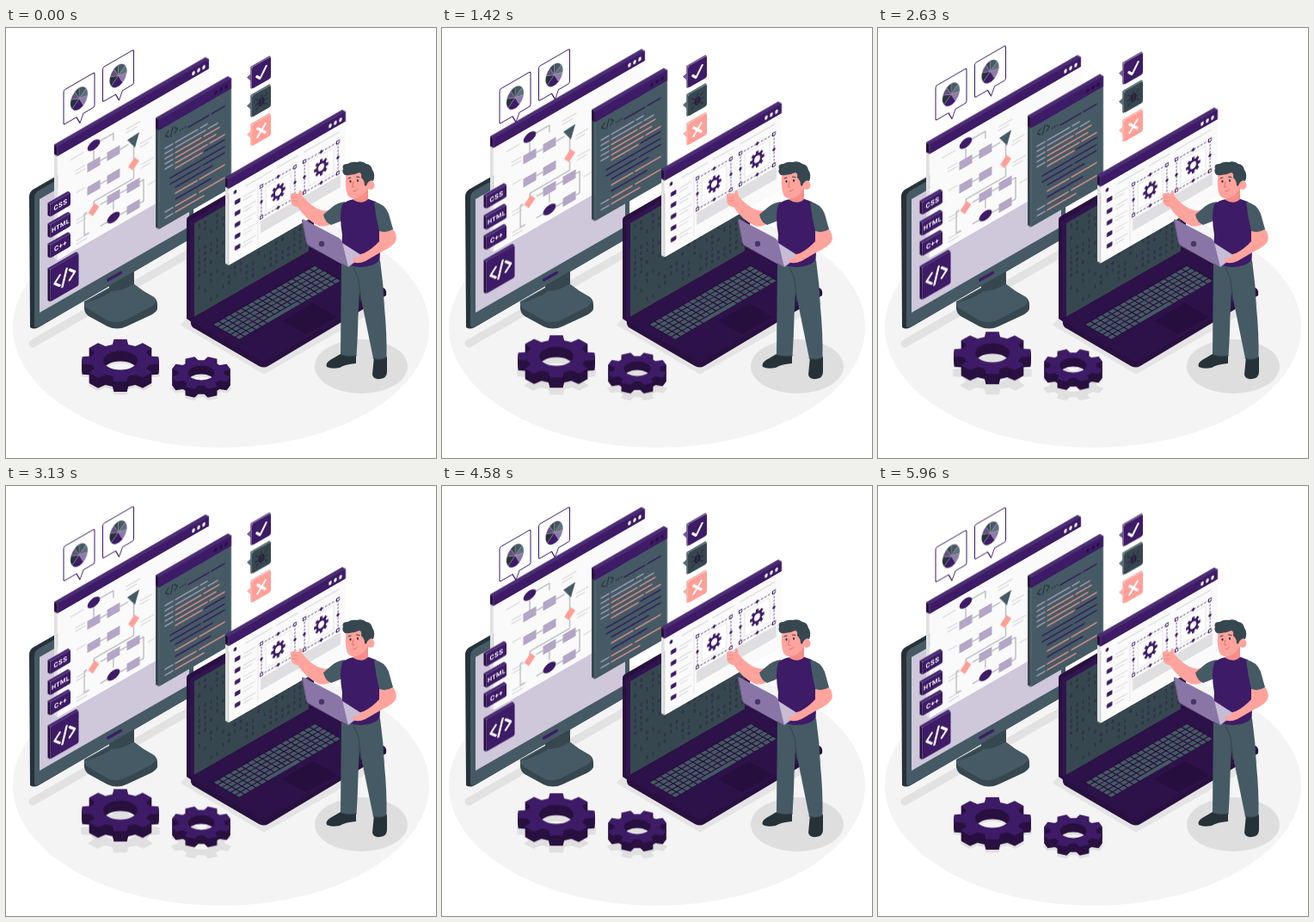
An HTML page that plays this animation: 500x500 px, repeating every 6000 ms.

```html
<!DOCTYPE html>
<html lang="en">
<head>
<meta charset="utf-8">
<title>Developer workspace</title>
<style>
  html, body { margin: 0; width: 100%; height: 100%; overflow: hidden; background: #fff; }
  svg { display: block; width: 100vw; height: 100vh; }
  text { font-family: Roboto, Inter, sans-serif; font-weight: 700; }
  .bits { font: 700 5.5px "DejaVu Sans Mono", monospace; white-space: pre; }
</style>
</head>
<body>
<svg id="stage" viewBox="0 0 500 500" xmlns="http://www.w3.org/2000/svg"></svg>
<script>
const C = {
  purple: '#3d1b66', deep: '#28103f', night: '#2d124a', edge: '#4b2c74', slate: '#455a64', dark: '#37474f',
  ink: '#263238', lilac: '#cfc7da', mauve: '#b3a6c6', pink: '#ff9f98', skin: '#ffa39d',
  pale: '#fafafa', grey: '#e0e0e0', line: '#c4c4c8'
};

// Drawing helpers
const poly = (pts, fill, extra = '') => `<polygon points="${pts}" fill="${fill}" ${extra}/>`;
const path = (d, fill, extra = '') => `<path d="${d}" fill="${fill}" ${extra}/>`;
const stroke = (d, color, w = 1, extra = '') =>
  path(d, 'none', `stroke="${color}" stroke-width="${w}" stroke-linecap="round" stroke-linejoin="round" ${extra}`);
const oval = (x, y, rx, ry, fill) => `<ellipse cx="${x}" cy="${y}" rx="${rx}" ry="${ry}" fill="${fill}"/>`;
const rect = (x, y, w, h, fill, extra = '') =>
  `<rect x="${x}" y="${y}" width="${w}" height="${h}" fill="${fill}" ${extra}/>`;
const at = (x, y, s, more = '') => `<g transform="translate(${x} ${y}) ${more}">${s}</g>`;
const wall = (x, y, s) => at(x, y, s, 'skewY(-30)');
const float = (ms, s) => `<g data-ms="${ms}">${s}</g>`;
const range = (n, f) => Array.from({ length: n }, (_, i) => f(i)).join('');

let seed = 7;
const rnd = () => (seed = (seed * 16807) % 2147483647) / 2147483647;

// A slab facing right-forward, with its left and top edges visible
function slab(w, h, d, front, side, top, round = 0) {
  const t = d * 1.155;
  return poly(`0,0 ${-d},${-t} ${-d},${h - t} 0,${h}`, side) +
    poly(`0,0 ${-d},${-t} ${w - d},${-t} ${w},0`, top) +
    rect(0, 0, w, h, front, `rx="${round}"`);
}

function panel(x, y, w, h, head, body, side, dots, content) {
  return wall(x, y,
    slab(w, h, 4, body, side, C.purple) +
    slab(w, head, 4, C.purple, C.deep, C.edge) +
    range(3, i => oval(w - 18 + i * 6, head / 2 + .3, 1.7, 2.4, dots)) + content);
}

function gearPath(r, turn, flat = .55, hole = .44, root = .77) {
  const pts = [];
  for (let i = 0; i < 8; i++) {
    const mid = i * Math.PI / 4 + turn;
    for (const [da, k] of [[-.26, root], [-.17, 1], [.17, 1], [.26, root]]) {
      const x = r * k * Math.cos(mid + da), y = r * k * flat * Math.sin(mid + da);
      pts.push(`${x.toFixed(2)} ${y.toFixed(2)}`);
    }
  }
  const a = r * hole, b = a * flat;
  return `M${pts.join('L')}ZM${-a} 0a${a} ${b} 0 1 0 ${2 * a} 0a${a} ${b} 0 1 0 ${-2 * a} 0Z`;
}
const gearFill = (d, fill) => path(d, fill, 'fill-rule="evenodd"');

function gear(x, y, r, turn, deep) {
  const d = gearPath(r, turn);
  return range(deep + 1, i => at(x, y + deep - i, gearFill(d, i === deep ? C.purple : C.deep)));
}
const gearShadow = (x, y, r, turn) => at(x, y, gearFill(gearPath(r * 1.03, turn), C.grey));

// Floor
const floor = oval(250, 348, 242, 140, '#f4f4f4') +
  oval(413, 393.5, 54, 31.5, '#dedede') +
  stroke('M31 367L212 262.500', '#e2e2e2', 9) +
  poly('205,345 300,401 440,321 430,300 220,330', '#e4e4e4', 'stroke="#e4e4e4" stroke-width="3" stroke-linejoin="round"') +
  gearShadow(133, 401, 45, 0) + gearShadow(227, 414, 35, Math.PI / 8);

// Desktop monitor
const monitor =
  path('M91 318L120 302V288L149 270V298Q160 307 172 313Q176 316 176 322V327Q174 331 168 334L140 347Q129 352 118 347L96 335Q91 331 91 326Z', C.dark) +
  path('M92 318L120 302L149 298Q160 307 172 313Q178 318 169 324L140 339Q129 345 118 340L96 327Q88 322 92 318Z', C.slate) +
  path('M120 284L147 268V298Q136 306 122 306Q121 310 92 320L120 303Z', C.dark) +
  path('M27 196Q27 191 31 188L212 84L218 90V243L38 348Q32 351 28 348Z', C.ink) +
  path('M33 198Q33 192 38 189L218 86V243L39 347Q33 350 33 345Z', C.slate) +
  poly('39,199 213,99 213,231 39,331', C.lilac) +
  stroke('M118.500 293L133.500 284.500', C.purple, 3.2);

// Flow chart window
const box = (u, v) => rect(u - 7.5, v - 5, 15, 10, C.mauve);
const diamond = (u, v) => poly(`${u + 1},${v - 7} ${u + 6.5},${v} ${u - 1},${v + 7} ${u - 6.5},${v}`, C.pink);
const chart =
  stroke('M49 22H65V30M42 29V40M50 45H57M73 45H82M88.500 46V65M88.500 78V88H42V96M50 72H57' +
    'M34 96H31V121H36M50 96H57M73 96H81M96 96H100V121H96M50 121H57M65 101V111M73 121H81', '#777782', .7) +
  oval(42, 22.5, 7.3, 5.4, C.purple) + oval(65, 120, 7.5, 5.4, C.purple) +
  [[42, 45], [65, 45], [42, 72], [65, 72], [65, 96], [88, 96], [88, 121]].map(p => box(...p)).join('') +
  poly('81,39 95,38 90,53', C.slate) + diamond(88.5, 71) + diamond(42, 97.5) +
  stroke('M80 26H96M80 30H92M96 52H110M96 56H106M97 77H112M97 81H108M15 24H30M21 40H32M21 44H32' +
    'M22 66H32M22 98H35M22 102H33M22 122H37M22 126H34M105 105H114', C.line, .8);
const flow = panel(60, 138, 176, 132, 11, C.pale, C.grey, '#fff', chart);

// Speech bubbles with pie charts
const sectors = [[0, 55, C.slate], [55, 100, '#5d7079'], [100, 150, '#8d7ba8'], [150, 235, C.purple],
  [235, 290, C.ink], [290, 330, '#66507f'], [330, 360, C.dark]];
function pie(u, v) {
  const p = a => `${10 * Math.sin(a * Math.PI / 180)} ${-12.5 * Math.cos(a * Math.PI / 180)}`;
  return at(u, v, sectors.map(([a, b, c]) =>
    path(`M0 0L${p(a)}A10 12.500 0 0 1 ${p(b)}Z`, c, 'stroke="#a99bbb" stroke-width=".3"')).join(''));
}
const bubble = (x, y) => wall(x, y,
  path('M2 0H34Q36 0 36 2V38Q36 40 34 40H23L19 49L15 40H2Q0 40 0 38V2Q0 0 2 0Z', '#fff',
    `stroke="${C.purple}" stroke-width="1" stroke-linejoin="round"`) + pie(18, 20));
const bubbles = bubble(67, 72.5) + bubble(112.5, 46);

// Code window: [from, to, row, colour]
const rows = [
  [34, 58, 28, 1], [61, 76, 28, 1], [7, 16, 37, 0], [19, 45, 37, 0], [48, 56, 37, 0],
  [7, 16, 43, 0], [19, 54, 43, 0], [57, 68, 43, 0], [7, 16, 49, 0], [19, 49, 49, 2], [52, 70, 49, 2],
  [7, 16, 55, 0], [19, 66, 55, 2], [7, 16, 61, 0], [19, 56, 61, 2], [59, 76, 61, 2],
  [19, 50, 67, 2], [53, 76, 67, 1], [13, 76, 75, 1], [13, 48, 82, 1], [51, 76, 82, 1],
  [19, 62, 89, 1], [19, 44, 96, 2], [47, 76, 96, 2], [19, 60, 103, 1],
  [7, 16, 111, 0], [19, 43, 111, 2], [47, 76, 111, 2], [7, 16, 118, 0], [19, 52, 118, 2]
];
const ink = ['#a9a3bd', '#32155a', '#e8958f'];
const code = panel(178, 107, 84, 127, 12, C.slate, C.dark, C.deep,
  stroke('M11 19L7.500 22.500L11 26M16 17.500L13.500 27.500M18 19L21.500 22.500L18 26', C.ink, 1.1) +
  range(3, i => oval(24.5 + i * 3, 26, .8, .9, C.ink)) +
  rows.map(([a, b, v, c]) => stroke(`M${a} ${v}H${b}`, ink[c], 1.4)).join(''));

// Language tags
const tag = (y, h, label, size) => wall(51.5, y,
  slab(23.5, h, 3, C.purple, C.deep, C.edge, 1.5) +
  `<text x="12" y="${h / 2 + size * .36}" font-size="${size}" text-anchor="middle" fill="#fff" letter-spacing=".4">${label}</text>`);
const tags = tag(205, 14.5, 'CSS', 7.8) + tag(229, 15, 'HTML', 7.2) + tag(252.5, 15, 'C++', 7.8) +
  wall(51.5, 281, slab(33, 37.5, 3, C.purple, C.deep, C.edge, 2) +
    stroke('M11 13L5 19L11 25M19 10L14 28M22.500 13L28.500 19L22.500 25', '#fff', 2.6));

// Large laptop
const bits = range(14, r => {
  let s = '';
  for (let i = 0; i < 19; i++) s += rnd() < .65 ? (rnd() < .5 ? '0' : '1') : ' ';
  return `<text class="bits" x="4" y="${8 + r * 7.2}" letter-spacing="3.600" fill="#2c2a45">${s}</text>`;
});
const keys = range(6, r => range(18, c => r === 5 && c > 4 && c < 11 ? '' :
  rect(1 + c * 6.6, .6 + r * 5.1, 5.4, 4, C.slate, 'rx=".5"'))) +
  rect(34, 26.1, 38.4, 4, C.slate, 'rx=".5"');
const laptop =
  path('M210 223Q210 220 214 218L354 137Q358 136 358 140V258L216 342L210 338Z', C.deep) +
  path('M214 224L355 142V255L216 338L214 336Z', C.purple, 'opacity=".4"') +
  poly('219,227 352,150 352,260 219,337', C.dark) +
  wall(219, 227, bits) +
  path('M215 338L358 256L440 303Q443 305 442 311L305 393Q300 396 294 393L217 348Q214 345 215 338Z', C.deep) +
  path('M216 338L358 256L440 303Q443 306 438 309L305 386Q300 389 295 386L218 342Q214 340 216 338Z', C.night) +
  poly('238,345 359,275 392,293 271,363', C.deep) +
  at(240, 345, keys, 'matrix(1 -.577 1 .577 0 0)') +
  poly('321,341 357,320 385,336 349,356', '#260e3e');

// Design window
const artboard = u => {
  const marks = [[0, 0], [39, 0], [0, 36], [39, 36]];
  const mids = [[19.5, 0], [0, 18], [39, 18], [19.5, 36]];
  return at(u, 30,
    rect(5, 4, 29, 28, '#fff', `stroke="${C.grey}" stroke-width=".8"`) +
    rect(0, 0, 39, 36, 'none', `stroke="${C.purple}" stroke-width=".8" stroke-dasharray="2.400 1.600"`) +
    marks.map(([x, y]) => rect(x - 1.5, y - 1.7, 3, 3.4, '#fff', `stroke="${C.purple}" stroke-width=".9"`)).join('') +
    mids.map(([x, y]) => poly(`${x},${y - 2.4} ${x + 2},${y} ${x},${y + 2.4} ${x - 2},${y}`, C.purple)).join('') +
    at(19.5, 18, gearFill(gearPath(10, 0, 1, .42, .72), C.purple), 'scale(.84 .97)'));
};
const design = panel(259, 176, 136, 100, 11, C.pale, C.grey, '#fff',
  oval(7.5, 19, 1.8, 2.2, C.purple) +
  stroke('M20 19H50M56 19H80M88 19H128', '#dedee0', 1.6) +
  stroke('M34 25V94', C.grey, .8) +
  range(5, i => rect(7, 29 + i * 13.3, 6.5, 5, C.purple, 'rx="1"') +
    stroke(`M17 ${30 + i * 13.3}H31M17 ${34 + i * 13.3}H27`, '#d2d2d6', .9)) +
  rect(37, 70, 93, 14, '#dfdfe1') + artboard(38) + artboard(88));

// Status badges
const badge = (y, face, tail, icon) => wall(286, y,
  poly('0,6 -6,8 0,17', tail) +
  slab(22, 25, 1.8, face, tail, tail, 2) + icon);
const badges =
  badge(46, C.purple, '#735a92', stroke('M5.500 13.500L9.500 18L16.500 8', '#fff', 2.6)) +
  badge(79, C.dark, '#596c75',
    oval(11, 13, 3.6, 5, '#28203f') +
    stroke('M11 7V5M7 9L4.500 6.500M15 9L17.500 6.500M7 13H4M15 13H18M7 17L4.500 19.500M15 17L17.500 19.500', '#28203f', .9) +
    stroke('M11 9V17', C.dark, .8)) +
  badge(112.5, C.pink, '#f9b3ad', stroke('M6.500 8L15.500 18M15.500 8L6.500 18', '#fff', 2.6));

const gears = gear(133, 386.5, 45, 0, 12) + gear(227, 401, 35, Math.PI / 8, 10);

// Man with a small laptop
const man =
  path('M389 379Q384 382 377 386Q371 390 373 394Q378 397 388 395Q394 391 407 390V379Z', C.ink) +
  path('M428 382L426 403Q427 409 435 408Q443 407 443 400V382Z', C.ink) +
  path('M390 270Q412 281 435 270Q439 298 440 325Q443 355 442.500 383Q435 387 427 384L416 330L411 306L409.500 335Q409 360 407.500 381Q398 383 389 380L389.500 320Z', C.slate) +
  stroke('M404 279Q411 290 411 303L413 318', C.dark, 1.2) +
  stroke('M427 384Q435 387 442.500 383M389 380Q398 383 407.500 381', C.dark, 1) +
  path('M376 212Q362 215 346 197L337 205Q349 224 364 230Q373 232 380 226Z', C.skin) +
  path('M394 202Q384 203 376 211L369 217Q371 226 378 229Q386 226 393 223Z', C.slate) +
  path('M331 196Q330 192 335 192L340 193L341.500 188.500Q345 189 344.500 195L349 201L341 208Q334 209 331.500 203Z', C.skin) +
  stroke('M333 197H339M333 201H339', '#e8827d', .7) +
  path('M391 205Q397 200 405 199Q412 202 419 198L430 202Q437 208 437 220L434.500 270Q427 278 412 278Q396 277 389.500 271L391 240Q387 218 391 205Z', C.purple) +
  path('M405 194L421 182V199Q414 206 404 200Z', '#f58d88') +
  path('M396 167Q393 182 397 194Q400 199 407 198Q415 196 420 188L423 170L412 161Z', C.skin) +
  oval(424, 183, 4.5, 5, C.skin) +
  // wavy hair with a short fringe
  path('M394 171Q390 168 392 164Q390 158 397 158Q402 155 408 156Q414 154 419 158Q425 159 426 165Q430 170 427 178Q423 176 420 181Q419 185 417 183Q417 177 413 174Q414 169 411 168Q403 172 394 171Z', C.dark) +
  oval(400.5, 178.5, 1, 1.4, C.ink) + oval(409, 177.5, 1, 1.4, C.ink) +
  stroke('M398 175L401 174M407.500 173L411 173.500', C.ink, .9) +
  stroke('M404 179L402.500 184.500L405 185M404 190Q407 190 408.500 187.500', '#d96d6a', .9) +
  // small laptop
  path('M388 248L413 264Q414 266 411 268L398 278L387 268Z', '#c7bcd5') +
  stroke('M398 278L412 267.500', '#877499', 1) +
  path('M344 224Q344 221 347 223L387 244Q390 246 391 249L398 278L354 254Q350 252 349 249Z', '#8a76a6') +
  stroke('M344.500 223.500L349.500 250Q351 253 354 254.500L397.500 278', '#665080', .8) +
  oval(367, 251, 3.2, 3.2, '#4b346b') +
  // near arm
  path('M434 236L449 232Q456 242 453 248Q450 254 437 260L418 271Q409 275 404 272L403 268L411 267Q409 263 416 262Q426 257 434 248Z', C.skin) +
  path('M428 202Q440 204 445 216L450 234Q442 239 434 236Q430 220 428 202Z', C.slate);

const stage = document.getElementById('stage');
stage.innerHTML = floor + monitor + float(1500, flow) + float(750, bubbles) + float(1500, code + tags) +
  laptop + float(1500, design) + float(750, badges) + float(3000, gears) + man;

// Each floating group rises ten units and sinks back at constant speed
for (const g of stage.querySelectorAll('[data-ms]')) {
  g.animate(
    [{ transform: 'translateY(0px)' }, { transform: 'translateY(-10px)' }],
    { duration: +g.dataset.ms, direction: 'alternate', iterations: Infinity, easing: 'linear' }
  );
}
</script>
</body>
</html>
```
